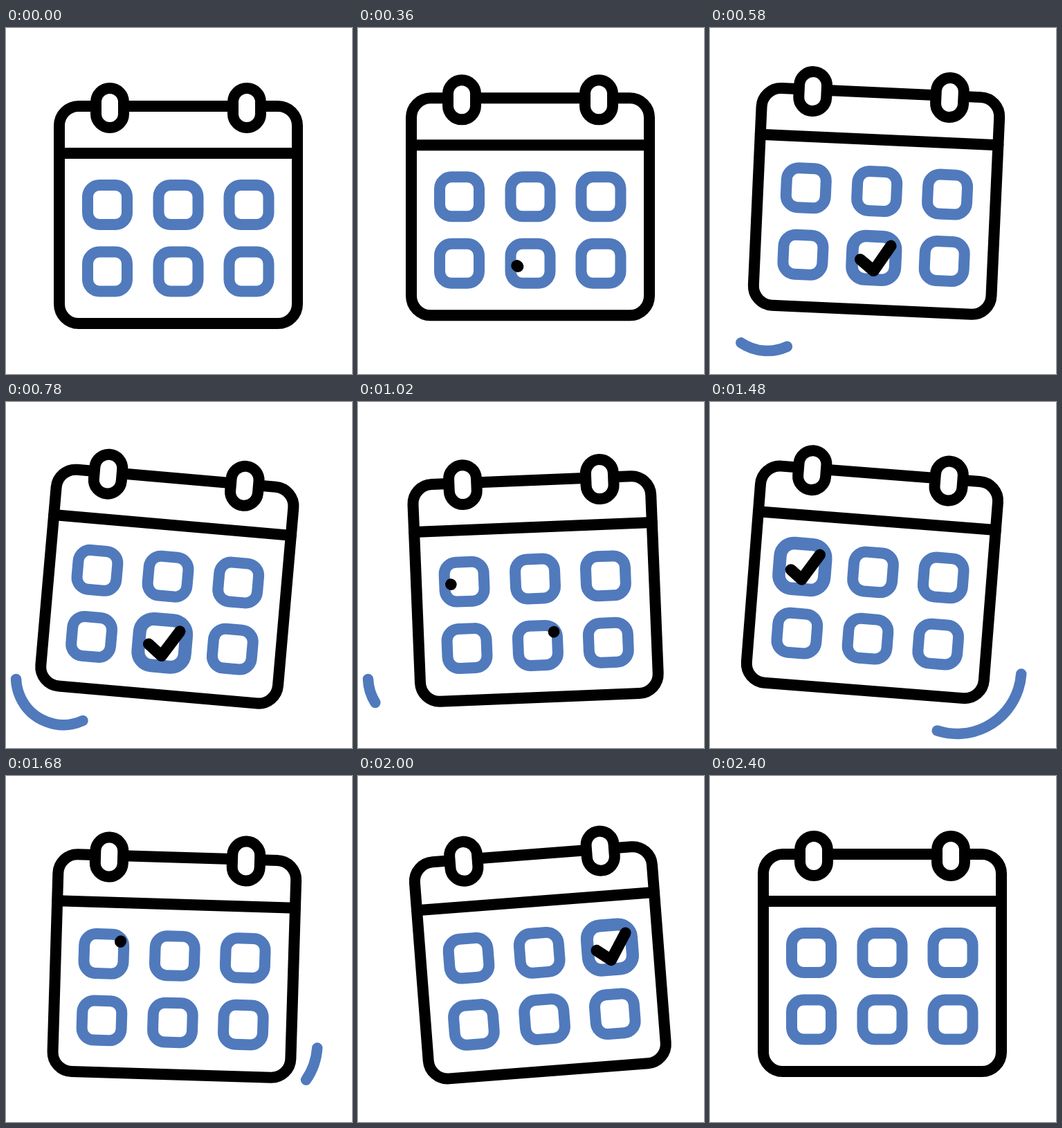
Write an HTML page with a canvas that moves like this. It is 500 by 500 pixels and loops after 2.84 s.

```html
<!DOCTYPE html>
<html lang="en">
<head>
<meta charset="utf-8">
<title>Calendar</title>
<style>
  html, body { margin: 0; width: 100%; height: 100%; overflow: hidden; background: #fff; }
  canvas { display: block; width: 500px; height: 500px; }
</style>
</head>
<body>
<canvas id="stage" width="500" height="500"></canvas>
<script>
const ctx = document.getElementById('stage').getContext('2d');
const BLUE = '#507abc', BLACK = '#000';
const LOOP = 2840, STEP = 20;
const BEAT = 1150 / 3;
const PIVOT = { x: 249, y: 83 };

const clamp = v => Math.min(1, Math.max(0, v));
const ease = v => { v = clamp(v); return v * v * (3 - 2 * v); };
const progress = (t, from, to) => ease((t - from) / (to - from));

// Eased values on an even beat, held at both ends.
function track(t, start, values) {
  const pos = Math.min(values.length - 1, Math.max(0, (t - start) / BEAT));
  const i = Math.min(values.length - 2, Math.floor(pos));
  return values[i] + (values[i + 1] - values[i]) * ease(pos - i);
}

const swing = t => track(t, BEAT, [0, 5, -5, 5, -5, 0]) * Math.PI / 180;
const bounce = t => track(t, 150, [0, -20.4, 4.6, -20.4, 4.6, 0]);

const columns = [146.5, 249, 351];
const rows = [255.5, 352];

// pop: growth start, peak and end; mark: first and last moment of the tick.
const ticks = [
  { col: 1, row: 1, pop: [432, 732, 1032], mark: [333, 1033] },
  { col: 0, row: 0, pop: [1090, 1390, 1690], mark: [1010, 1700] },
  { col: 2, row: 0, pop: [1825, 2120, 2415], mark: [1740, 2398] }
];
const TICK_TIME = 260;

const trails = [
  { x: 83, y: 398, r: 68.5, from: 65.5, to: 178, start: BEAT },
  { x: 357, y: 386.5, r: 93, from: 113, to: 4, start: 1047 }
];

function pen(color, width) {
  ctx.strokeStyle = color;
  ctx.lineWidth = width;
}

function box(cx, cy, w, h, r, fill) {
  ctx.beginPath();
  ctx.roundRect(cx - w / 2, cy - h / 2, w, h, r);
  if (fill) {
    ctx.fillStyle = fill;
    ctx.fill();
  }
  ctx.stroke();
}

function drawFrame() {
  pen(BLACK, 16);
  box(249, 270, 344, 314, 28);
  ctx.beginPath();
  ctx.moveTo(77, 181);
  ctx.lineTo(421, 181);
  ctx.stroke();
  for (const x of [150, 348]) box(x, 115.5, 40, 57, 20, '#fff');
}

function drawDay(t, col, row) {
  const tick = ticks.find(k => k.col === col && k.row === row);
  let scale = 1;
  if (tick) {
    const [start, peak, end] = tick.pop;
    scale += 0.2 * (progress(t, start, peak) - progress(t, peak, end));
  }
  ctx.save();
  ctx.translate(columns[col], rows[row]);
  ctx.scale(scale, scale);
  pen(BLUE, 16);
  box(0, 0, 57, 57, 17);
  ctx.restore();
}

function drawTick(t, { col, row, mark: [start, end] }) {
  if (t <= start || t >= end) return;
  const points = [[-19.5, 3], [0.5, 18.5], [24, -19]];
  const bend = 0.364;
  const head = progress(t, start, start + TICK_TIME);
  const tail = progress(t, end - TICK_TIME, end);
  const at = f => {
    const [a, b] = f < bend ? points : points.slice(1);
    const u = f < bend ? f / bend : (f - bend) / (1 - bend);
    return [a[0] + (b[0] - a[0]) * u, a[1] + (b[1] - a[1]) * u];
  };
  ctx.save();
  ctx.translate(columns[col], rows[row]);
  pen(BLACK, 16.5);
  ctx.beginPath();
  ctx.moveTo(...at(tail));
  if (tail < bend && head > bend) ctx.lineTo(...points[1]);
  ctx.lineTo(...at(head));
  ctx.stroke();
  ctx.restore();
}

function drawTrail(t, { x, y, r, from, to, start }) {
  const head = progress(t, start, start + BEAT);
  const tail = progress(t, start + BEAT, start + 2 * BEAT);
  if (head - tail < 0.001) return;
  const angle = f => (from + (to - from) * f) * Math.PI / 180;
  pen(BLUE, 15.5);
  ctx.beginPath();
  ctx.arc(x, y, r, angle(tail), angle(head), to < from);
  ctx.stroke();
}

function draw(t) {
  ctx.fillStyle = '#fff';
  ctx.fillRect(0, 0, 500, 500);
  ctx.lineCap = ctx.lineJoin = 'round';
  trails.forEach(trail => drawTrail(t, trail));
  ctx.save();
  ctx.translate(PIVOT.x, PIVOT.y + bounce(t));
  ctx.rotate(swing(t));
  ctx.translate(-PIVOT.x, -PIVOT.y);
  drawFrame();
  rows.forEach((_, row) => columns.forEach((_, col) => drawDay(t, col, row)));
  ticks.forEach(tick => drawTick(t, tick));
  ctx.restore();
}

const origin = performance.now();
function loop() {
  const t = (performance.now() - origin) % LOOP;
  draw(Math.floor(t / STEP) * STEP);
  requestAnimationFrame(loop);
}
loop();
</script>
</body>
</html>
```
